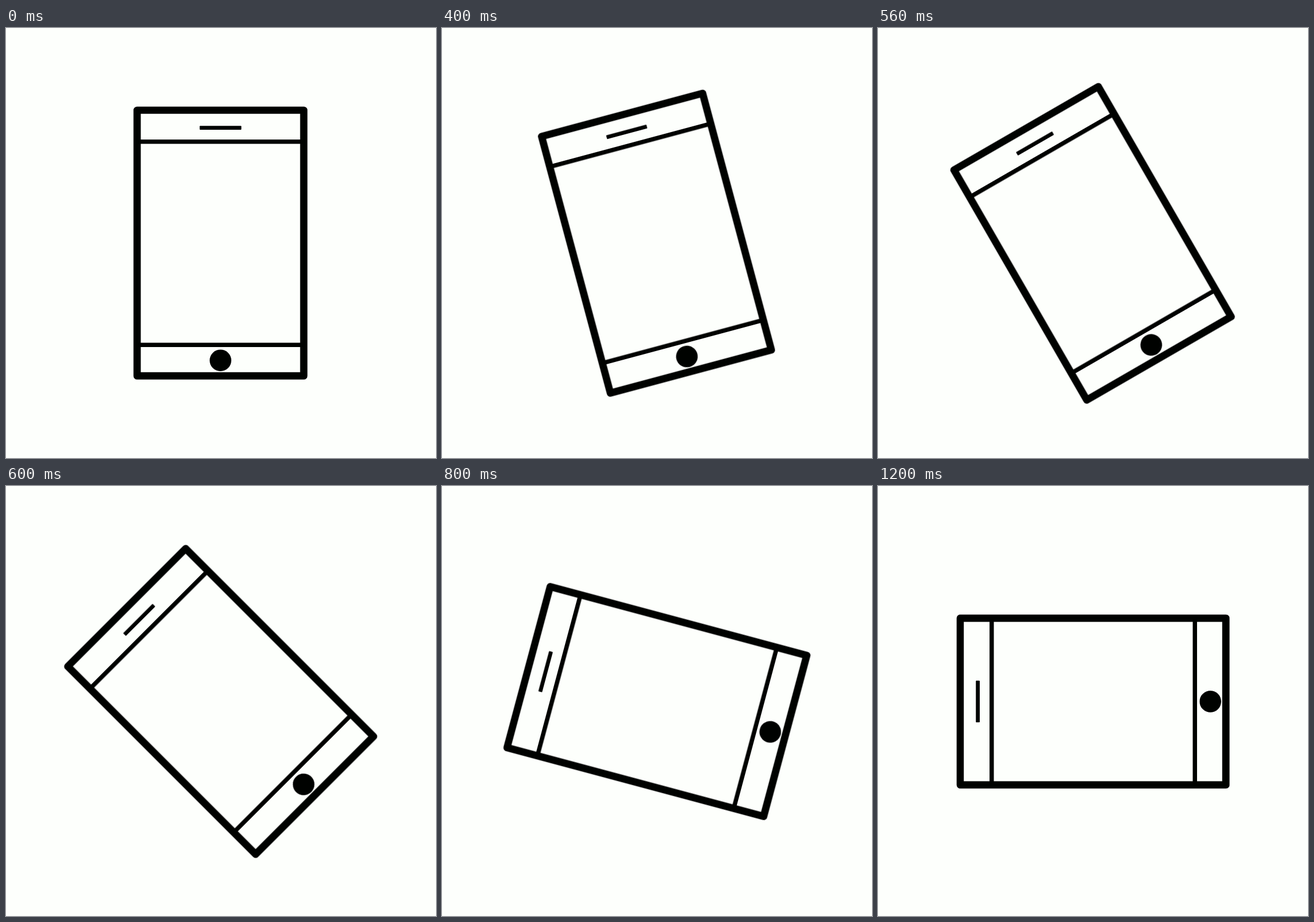
An HTML page that plays this animation: 748 by 748 pixels, repeating every 1400 ms.

```html
<!DOCTYPE html>
<html lang="en">
<head>
<meta charset="utf-8">
<title>Rotating phone</title>
<style>
  html, body {
    margin: 0;
    width: 100%;
    height: 100%;
    overflow: hidden;
    background: #fdfffc;
  }
  svg {
    display: block;
    width: 100%;
    height: 100%;
  }
  .phone {
    fill: #000200;
    stroke: #000200;
    stroke-width: 0;
    transform-origin: 374px 374px;
    animation: turn 1400ms infinite;
  }
  .body {
    fill: none;
    stroke-width: 12.7;
    stroke-linejoin: round;
  }
  .divider {
    stroke-width: 7.6;
  }
  /* Portrait hold, six jumps of 15 degrees, landscape hold */
  @keyframes turn {
    0% { transform: rotate(0deg); animation-timing-function: step-end; }
    28.5714% { transform: rotate(0deg); animation-timing-function: steps(6, start); }
    71.4285%, 100% { transform: rotate(-90deg); }
  }
</style>
</head>
<body>
<svg viewBox="0 0 748 748">
  <g class="phone">
    <rect class="body" x="228.1" y="143" width="289.9" height="462.2"/>
    <path class="divider" d="M228 197.8H518M228 551.2H518"/>
    <rect x="336.9" y="170.3" width="72.5" height="6.7" rx="1"/>
    <circle cx="373.1" cy="578.2" r="18.8"/>
  </g>
</svg>
</body>
</html>
```
